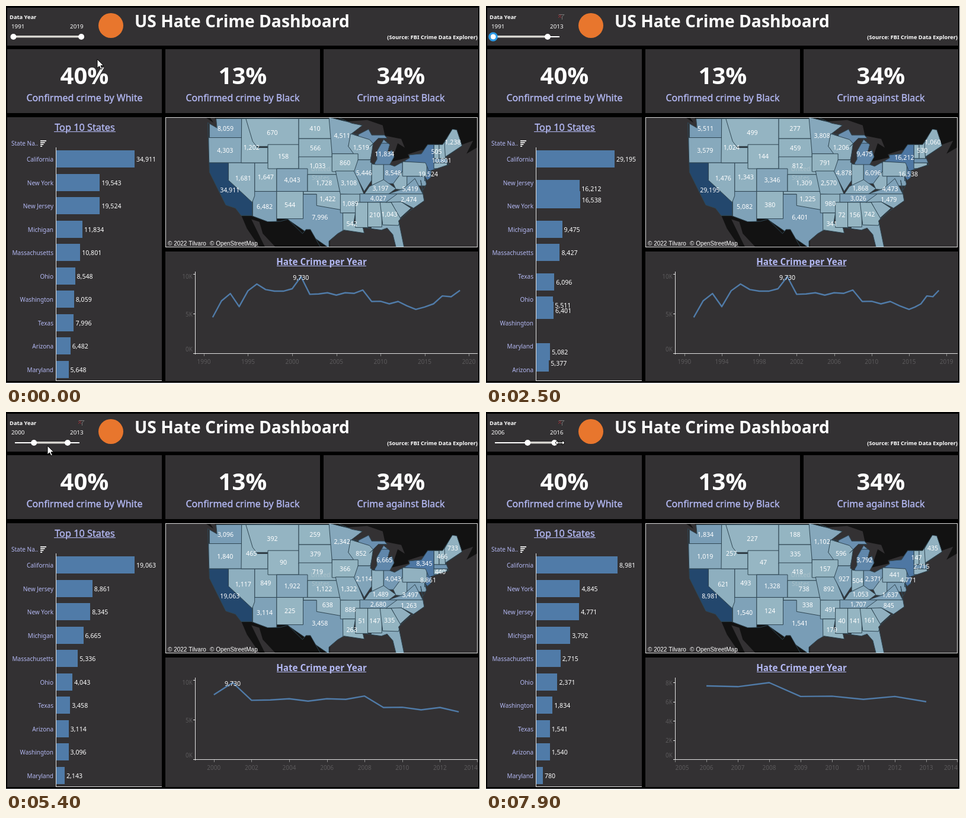
Write an HTML page with a canvas that moves like this. It is 800x639 px and loops after 8 s.

```html
<!DOCTYPE html>
<html lang="en">
<head>
<meta charset="utf-8">
<title>US Hate Crime Dashboard</title>
<style>
html, body { margin: 0; width: 100%; height: 100%; overflow: hidden; background: #000; }
canvas { display: block; }
</style>
</head>
<body>
<canvas id="stage" width="800" height="639"></canvas>
<script>
const c = document.getElementById('stage').getContext('2d');
const LOOP = 8000, STEP = 100;
const PANEL = '#333133', LILAC = '#b4b9f4', BLUE = '#507ba8', DIM = '#5b595b', WHITE = '#fff', RULE = '#e2e2e2';
const SANS = '"Noto Sans", "Open Sans", sans-serif', ARIAL = '"Liberation Sans", Arial, sans-serif';

const clamp = (v, a, b) => Math.min(b, Math.max(a, v));
const lerp = (a, b, p) => a + (b - a) * p;
const smooth = p => p * p * (3 - 2 * p);

// y is the middle of the capital letters; weight 500 is thickened by a hairline
function text(s, x, y, size, color = WHITE, align = 'left', weight = 400, family = SANS) {
  c.font = `${weight} ${size}px ${family}`;
  c.fillStyle = c.strokeStyle = color;
  c.textAlign = align;
  c.fillText(s, x, y + size * 0.357);
  if (weight === 500) {
    c.lineWidth = 0.35;
    c.strokeText(s, x, y + size * 0.357);
  }
}
function box(x, y, w, h, color) {
  c.fillStyle = color;
  c.fillRect(x, y, w, h);
}
function disc(x, y, r, color) {
  c.fillStyle = color;
  c.beginPath();
  c.arc(x, y, r, 0, 7);
  c.fill();
}
// keys: [time, value...]; numbers are interpolated, words held
function track(keys, t) {
  let i = 0;
  while (i < keys.length - 1 && keys[i + 1][0] <= t) i++;
  const a = keys[i], b = keys[i + 1] || a;
  const p = b === a ? 0 : (t - a[0]) / (b[0] - a[0]);
  return a.map((v, j) => typeof v === 'number' ? lerp(v, b[j], p) : v);
}

// ---- map: Mercator, points as degrees west,north ----
const merc = lat => Math.log(Math.tan(Math.PI / 4 + lat * Math.PI / 360)) * 180 / Math.PI;
const project = s => {
  const [west, north] = s.split(',').map(Number);
  return [442 + (111.05 - west) * 7.44, 275 - (merc(north) - 45.03) * 7.46];
};
// two points make a box, more make a polygon
function corners(points) {
  const p = points.split(' ').map(project);
  if (p.length > 2) return p;
  const [[l, t], [r, b]] = p;
  return [[l, t], [r, t], [r, b], [l, b]];
}
function outline(pts) {
  const path = new Path2D();
  pts.forEach(p => path.lineTo(...p));
  path.closePath();
  return path;
}
function centroid(pts) {
  let area = 0, x = 0, y = 0;
  pts.forEach(([ax, ay], i) => {
    const [bx, by] = pts[(i + 1) % pts.length], k = ax * by - bx * ay;
    area += k;
    x += (ax + bx) * k;
    y += (ay + by) * k;
  });
  return [x / area / 3, y / area / 3];
}
const shape = points => outline(corners(points));

const northEdge = '124.7,48.4 122.6,47.6 122.8,49 95.2,49.2 92,48.3 89.6,48 92.1,46.7 90.5,46.6 88.2,47.4 87.5,46.5 84.6,46.5 84,46 86,46 88,44.6 87.2,45.1 87.8,42.1 87,41.7 86.3,42.6 86.4,43.8 84.8,45.8 83.4,45 83.9,43.7 82.9,44.1 82.4,43 83.4,41.7 82.3,41.4 78.9,42.8 79,43.3 76.3,43.5 74.8,45 71.4,45 69.2,47.4 68.2,47.3 67,44.8 70.7,43 70,41.7 74,40.7';
const southEdge = '74.1,39.5 74.9,39 75.4,39.6 75.1,38.3 75.9,37.2 76.4,39 75.6,35.3 79.2,33.2 81.4,31.5 80.1,26 82,26.3 82.7,28.8 84,30.1 85.3,29.7 89.5,30.2 89.2,29.1 93.8,29.7 95.2,29 97.2,27.5 97.2,25.9 99.2,26.4 101.4,29.8 102.4,29.8 103.2,29 106.5,31.8 108.2,31.4 111.1,31.33 114.8,32.5 117.1,32.5 118.4,33.9 120.6,34.5 122.4,37.4 124.3,40.4';
const country = shape(northEdge + ' ' + southEdge);
const darkLand = [
  '134,51 124,50 122,48 95,48.5 88.5,48.8 85,48 84.5,46.4 80.8,45.9 80,44.5 81.6,45.2 83,42.2 79,42.9 79.3,43.4 76.3,44.1 71,44 67,45 64.5,45.6 66,43.5 60,46 60,51',
  '128.2,50.5 125,50 123.4,48.4',
  '117.1,32.6 97,32 97,25 108,25 112.2,29 113,31.3 114.8,31.8 111,25 112,25 115.8,30'
].map(shape);

// totals for the four year ranges; bracketed ones stay off the map
const states = [];
function state(name, totals, points) {
  const pts = corners(points), labels = totals.split(' ');
  const values = labels.map(s => Number(s.replace(/\D/g, '')));
  states.push({ name, labels, values, path: outline(pts), at: centroid(pts) });
}
state('Florida', '(3,800)', '87.6,31 80,25');
state('Upper Michigan', '- (9,900)', '90.5,47.6 84,45');
state('Washington', '8,059 5,511 3,096 1,834', '124.3,49 117,46');
state('Oregon', '4,303 3,579 1,840 1,019', '124.5,46.1 117,42');
state('Montana', '670 499 392 227', '116.05,49 104.05,44.7');
state('Utah', '1,647 1,343 849 493', '114.05,42 109.05,37');
state('Arizona', '6,482 5,082 3,114 1,540', '114.5,37 109.05,31.3');
state('California', '34,911 29,195 19,063 8,981', '124.4,42 120,42 120,39 114.6,35 114.6,32.5 117.1,32.5 120.6,34.5 124.4,40.4');
state('Nevada', '1,681 1,476 1,117 621', '120,42 114.05,42 114.05,36.2 114.6,35 120,39');
state('Idaho', '1,202 1,024 465 257', '117,49 116.05,49 114.5,45.5 113.4,44.5 111.05,44.5 111.05,42 117.1,42');
state('Wyoming', '158 144 90 47', '111.05,45 104.05,41');
state('North Dakota', '410 277 259 188', '104.05,49 96.7,45.94');
state('South Dakota', '566 459 379 335', '104.05,45.94 96.5,42.8');
state('Nebraska', '1,033 812 719 418', '104.05,43 95.5,40');
state('Colorado', '4,043 3,346 1,922 1,328', '109.05,41 102.05,37');
state('Kansas', '1,728 1,309 1,122 738', '102.05,40 94.6,37');
state('Texas', '7,996 6,401 3,458 1,541', '105.4,36.5 94.05,36.5 93.7,26 97,26 106.6,31.8');
state('New Mexico', '544 380 225 124', '109.05,37 103.05,31.9');
state('Oklahoma', '1,422 1,225 638 338', '103,37 103,36.5 100,36.5 100,34.4 94.5,33.6 94.5,37');
state('Minnesota', '4,511 3,808 2,342 1,102', '97.2,49.2 89.6,48 92.3,46 92.8,44.7 91.2,43.5 96.5,43.5');
state('Wisconsin', '1,519 1,206 852 596', '92.3,46.7 88,45.8 87,45 87.8,42.5 90.6,42.5 92.8,44.7');
state('Iowa', '860 791 366 157', '96.5,43.5 90.6,40.5');
state('Missouri', '3,108 2,570 1,322 892', '95.7,40.6 91.4,40.6 89.2,36.4 94.6,36.5');
state('Arkansas', '1,089 980 888 491', '94.6,36.5 90.1,33');
state('Louisiana', '542 341 263 179', '94.05,33 91.2,33 91.6,31 89.6,31 89,29 94,29.5');
state('Illinois', '5,446 4,878 2,114 927', '90.6,42.5 87.5,42.5 87.5,39 89.2,37 91.5,40.5');
state('Indiana', '- - - 504', '87.5,41.8 84.8,38');
state('Ohio', '8,548 6,096 4,043 2,371', '84.8,42 80.5,38.4');
state('Michigan', '11,834 9,475 6,665 3,792', '86.8,45.2 82.4,41.7');
state('Kentucky', '3,197 1,868 1,489 1,053', '89.2,36.5 88,37.9 84.8,39.1 82,37.5 83.7,36.5');
state('Tennessee', '4,027 3,026 2,680 1,707', '90.2,36.55 81.8,35');
state('Mississippi', '- 72 51 40', '91.2,35 88.3,30.2');
state('Alabama', '210 156 147 141', '88.4,35 85.2,30.3');
state('South Carolina', '(2,000)', '83.2,35.2 80.8,35.1 78.6,33.9 81.1,32');
state('Georgia', '1,043 742 335 161', '85.6,35 83.1,35 81,32 81.4,30.6 85,30.7');
state('North Carolina', '2,474 1,479 1,263 845', '84.3,35 81.7,36.55 75.7,36.55 75.5,35.2 78,33.9 80.8,35.1');
state('West Virginia', '(1,400)', '82.6,38.4 80.5,40.6 77.7,39.3 80.3,37.3 82,37.4');
state('Maryland', '(5,648) (5,377) (2,143) (780)', '79.5,39.7 75,38');
state('Virginia', '5,419 4,473 3,497 1,637', '83.7,36.55 80.3,37.5 77.7,39.3 75.9,36.55');
state('New Jersey', '19,524 16,538 8,861 4,771', '75.5,41.3 73.9,38.9');
state('Pennsylvania', '- - - 441', '80.5,42.2 75,39.7');
state('Connecticut', '- - 440 -', '73.5,42 70.4,41');
state('Vermont', '505 - - 147', '73.4,45 72.2,42.7');
state('New Hampshire', '- 530 466 -', '72.2,45.3 70.8,42.7');
state('Massachusetts', '10,801 (8,427) (5,336) 2,715', '73.4,42.7 69.9,42');
state('Maine', '1,238 1,060 733 435', '71,45.3 69.2,47.5 67.8,47.3 67,44.8 70.8,43');
state('New York', '(19,543) 16,212 8,345 (4,845)', '80,42.2 79,43.4 76.2,43.5 74.8,45 73.4,45 73.4,41 72,41 74.5,40.6 75.3,42');

const peak = [0, 1, 2, 3].map(i => Math.max(...states.map(s => s.values[i] || 0)));
for (const s of states) {
  const share = Math.max(...s.values.map((v, i) => v / peak[i]));
  s.color = `rgb(${track([[0, 151, 183, 195], [0.56, 78, 119, 163], [1, 35, 71, 109]], share).slice(1)})`;
}

function drawMap(phase) {
  box(269, 188, 527, 220, '#dcdcdc');
  c.save();
  c.beginPath();
  c.rect(270, 189, 525, 218);
  c.clip();
  box(270, 189, 525, 218, PANEL);
  c.fillStyle = '#121212';
  darkLand.forEach(p => c.fill(p));
  c.lineWidth = 1;
  c.lineJoin = 'round';
  c.strokeStyle = '#2f4653';
  c.save();
  c.clip(country);
  for (const s of states) {
    c.fillStyle = s.color;
    c.fill(s.path);
    c.stroke(s.path);
  }
  c.restore();
  c.stroke(country);
  ['United', 'States'].forEach((w, i) => text(w, 531, 275 + i * 15, 10.5, 'rgba(205,215,218,.45)', 'center'));
  for (const s of states) {
    if (/^\d/.test(s.labels[phase] || '')) text(s.labels[phase], ...s.at, 10.6, WHITE, 'center');
  }
  text('© 2022 Tilvaro', 273, 401, 10, WHITE, 'left', 400, ARIAL);
  text('© OpenStreetMap', 344, 401, 10, WHITE, 'left', 400, ARIAL);
  c.restore();
}

// ---- bars ----
const byTotal = i => (a, b) => b.values[i] - a.values[i];
const top10 = [...states].sort(byTotal(0)).slice(0, 10);
const ranks = peak.map((_, i) => [...top10].sort(byTotal(i)));
const rowY = i => 259.3 + 39.5 * i;
const barLength = (s, i) => s.values[i] / peak[i] * (peak[i] < 10000 ? 138 : 133);

function drawBars(prev, phase, p) {
  text('Top 10 States', 133, 205, 16.3, LILAC, 'center', 500);
  box(81, 212, 104, 1, LILAC);
  text('State Na..', 9, 232, 10, LILAC);
  for (let i = 0; i < 4; i++) box(58, 227 + i * 3, 10 - i * 2.3, 2, '#ddd');
  const bars = ranks[phase].map((s, i) => ({
    s, i,
    y: rowY(lerp(ranks[prev].indexOf(s), i, p)),
    w: lerp(barLength(s, prev), barLength(s, phase), p)
  }));
  for (const { s, i, y, w } of bars) {
    box(84, Math.round(y - 15.3), Math.round(w), 29, BLUE);
    text(s.name, 80, rowY(i) + 0.5, 10, LILAC, 'right');
  }
  for (const { s, y, w } of bars) text(s.values[phase].toLocaleString('en-US'), 87 + w, y, 10.6);
  box(84, 239, 1, 395, RULE);
  box(84, 633, 179, 1, RULE);
}

// ---- yearly line, in thousands from 1991 ----
const yearly = [4.6, 6.67, 7.6, 5.95, 7.95, 8.8, 8.1, 7.9, 7.9, 8.2, 9.73, 7.5, 7.55, 7.7, 7.4,
  7.7, 7.62, 8.04, 6.6, 6.63, 6.3, 6.6, 6.05, 5.6, 5.9, 6.3, 7.3, 7.2, 8];

function axis(from, to) {
  const pad = to - from > 20 ? 2 : 1, left = from - pad, span = to + pad - left;
  const top = Math.max(...yearly.slice(from - 1991, to - 1990));
  return { left, k: 477 / span, step: span > 30 ? 5 : span > 10 ? 2 : 1, ky: 130.5 / top, rise: top > 9 ? 5 : 2 };
}
const axes = [axis(1991, 2019), axis(1991, 2013), axis(2000, 2013), axis(2006, 2013)];

function drawLine(prev, phase, p, lo, hi) {
  text('Hate Crime per Year', 532.5, 432.5, 15.2, LILAC, 'center', 700);
  box(457, 439, 151, 1, LILAC);
  const a = axes[prev], b = axes[phase];
  const left = lerp(a.left, b.left, p), k = lerp(a.k, b.k, p), ky = lerp(a.ky, b.ky, p);
  const X = yr => 319 + (yr - left) * k, Y = v => 588 - v * ky;
  const folding = phase === 1 && p < 1;
  const step = folding ? 4 : b.step;

  box(319, 449, 1, 140, RULE);
  box(319, 587, 477, 1, RULE);
  for (let v = 0; Y(v) > 449; v += b.rise) {
    box(316, Math.round(Y(v)) - 1, 3, 1, RULE);
    text(v + 'K', 315, clamp(Y(v), 457, 580), 10, DIM, 'right');
  }
  const first = folding ? 1990 : Math.ceil(left / step) * step;
  for (let yr = first; X(yr) < 800; yr += step) {
    box(Math.min(795, Math.round(X(yr))), 588, 1, 4, '#8a8a8a');
    const shown = folding ? Math.floor(lerp(1990, yr, 1.043)) : yr;
    text(shown, clamp(X(yr), 331, 784.5), 601, 10, DIM, 'center');
  }

  c.save();
  c.beginPath();
  c.rect(319, 449, 477, 139);
  c.clip();
  c.beginPath();
  yearly.forEach((v, i) => {
    const yr = 1991 + i;
    if (yr < lo || yr > hi && !folding) return;
    // years that leave fold back onto the new end
    c.lineTo(X(yr > 2014 ? lerp(yr, 2014, folding ? clamp(p * 1.4, 0, 1) : 0) : yr), Y(v));
  });
  c.strokeStyle = BLUE;
  c.lineWidth = 2.4;
  c.lineJoin = 'round';
  c.stroke();
  c.restore();
  if (lo <= 2001) text('9,730', X(2001), 459, 10.6, WHITE, 'center');
}

// ---- header ----
const loKeys = [[0, 1991], [2800, 1991], [3500, 2000], [5700, 2000], [6200, 2006]];
const hiKeys = [[0, 2019], [500, 2019], [1400, 2013], [7200, 2013], [7900, 2016]];
const pointer = [
  [0, 154, 90, 'arrow'], [500, 127, 52, 'size'], [1400, 104, 52, 'busy'], [2300, 12, 52, 'busy'],
  [2800, 12, 52, 'size'], [3500, 45, 52, 'busy'], [4500, 45, 52, 'arrow'], [5400, 70, 57, 'arrow'],
  [5700, 47, 52, 'size'], [6200, 70, 52, 'busy'], [6600, 98, 52, 'busy'], [7200, 104, 52, 'size'], [7900, 125, 52, 'size']
];
const cursors = {
  arrow: new Path2D('M0 0V15L3.5 11.8L6 17L8.3 16L6 10.8H10.7Z'),
  size: new Path2D('M-8 0L-4 -4V-1.2H4V-4L8 0L4 4V1.2H-4V4Z')
};

function drawPointer(t) {
  const [, x, y, kind] = track(pointer, t);
  if (kind === 'busy') {
    c.beginPath();
    c.arc(x, y, 6.2, 0, 7);
    c.strokeStyle = '#2c9be8';
    c.lineWidth = 3.2;
    c.stroke();
    return;
  }
  c.save();
  c.translate(x, y);
  c.fillStyle = WHITE;
  c.strokeStyle = '#000';
  c.lineWidth = 1;
  c.fill(cursors[kind]);
  c.stroke(cursors[kind]);
  c.restore();
}

function drawHeader(t, lo, hi) {
  text('Data Year', 6, 19, 9.3, WHITE, 'left', 700);
  text(Math.round(lo), 9, 35, 9.8);
  text(Math.round(hi), 130.5, 35, 9.8, WHITE, 'right');
  if (t >= 600) {
    c.lineWidth = 1;
    c.strokeStyle = '#777';
    c.stroke(new Path2D('M123 14.5H132L128.5 18V23'));
    c.strokeStyle = '#a03038';
    c.stroke(new Path2D('M122 15L127 20M127 15L122 20'));
  }
  const a = 12.5 + (lo - 1991) * 3.85, b = 104 + (hi - 2013) * 3.85;
  box(15, 51, 109, 2, WHITE);
  box(a, 50, b - a, 3.5, '#d6d4cf');
  disc(a, 52, 5, WHITE);
  disc(b, 52, 5, WHITE);
  disc(177, 33, 21, '#e8762d');
  text('US Hate Crime Dashboard', 217, 25.5, 28.2, WHITE, 'left', 700);
  text('(Source: FBI Crime Data Explorer)', 796, 52.5, 9.25, WHITE, 'right', 700);
}

const cards = [['40%', 'Confirmed crime by White'], ['13%', 'Confirmed crime by Black'], ['34%', 'Crime against Black']];
const updates = [2400, 4200, 6900];

function draw(t) {
  box(0, 0, 800, 639, '#000');
  box(0, 637, 800, 2, WHITE);
  box(799, 0, 1, 639, WHITE);
  box(2, 3, 795, 64, PANEL);
  box(2, 188, 261, 446, PANEL);
  box(269, 415, 528, 219, PANEL);

  const phase = updates.filter(u => u <= t).length, prev = Math.max(0, phase - 1);
  const p = phase ? smooth(clamp((t - updates[prev]) / 300, 0, 1)) : 1;
  const lo = track(loKeys, t)[1], hi = track(hiKeys, t)[1];

  cards.forEach(([share, note], i) => {
    const x = 2 + i * 267;
    box(x, 73, 261, 108, PANEL);
    text(share, x + 130.5, 118, 40, WHITE, 'center', 700);
    text(note, x + 130.5, 155.5, 16, LILAC, 'center', 500);
  });
  drawBars(prev, phase, p);
  drawMap(phase);
  drawLine(prev, phase, p, Math.round(lo), phase ? Math.min(2013, hi) : Math.round(hi));
  drawHeader(t, lo, hi);
  drawPointer(t);
}

const start = performance.now();
function frame() {
  const t = (performance.now() - start) % LOOP;
  draw(Math.floor(t / STEP) * STEP);
  requestAnimationFrame(frame);
}
frame();
</script>
</body>
</html>
```
